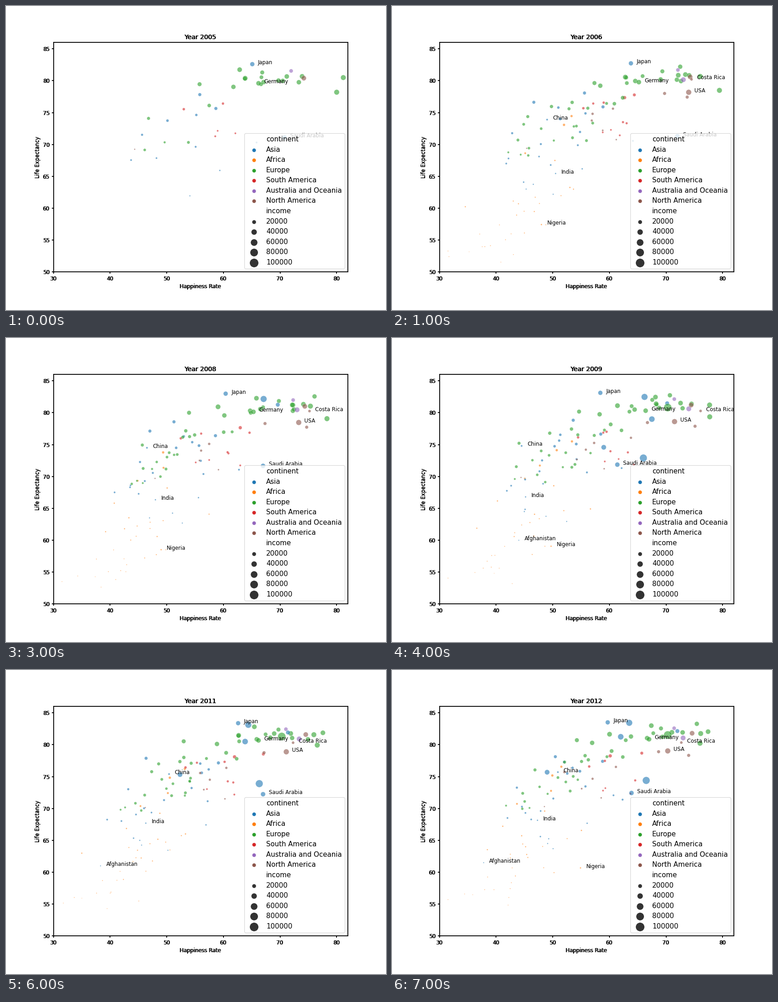
Recreate the animation shown at these times as a matplotlib script. Size 837 by 669 pixels, loop 8000 ms.

```python
import numpy as np
import matplotlib.pyplot as plt
from matplotlib.animation import FuncAnimation

W, H = 837, 669
YEARS = range(2005, 2013)
K = 1.1625  # pixels per typographic point of the chart

plt.rcParams.update({
    "font.family": "DejaVu Sans", "font.size": 10 * K,
    "axes.titlesize": 12 * K, "axes.titlepad": 6 * K, "axes.labelpad": 4 * K,
    "axes.linewidth": 1.6 * K,
    **{f"{a}tick.major.{part}": size * K for a in "xy"
       for part, size in (("size", 3.5), ("pad", 3.5), ("width", 1.6))},
})

ASIA, AFRICA, EUROPE = "#1f77b4", "#ff7f0e", "#2ca02c"
SOUTH, OCEANIA, NORTH = "#d62728", "#9467bd", "#8c564b"

rng = np.random.default_rng(12)
dots = [[] for _ in YEARS]    # (happiness, life, radius, colour) by year
labels = [[] for _ in YEARS]  # (happiness, life, name) by year


def follow(color, radius, life, growth, moods, name=""):
    """One country; moods run up to the last year."""
    first = len(YEARS) - len(moods)
    for t, mood in enumerate(moods, first):
        if mood:
            dots[t].append((mood, life + growth * t, radius, color))
            labels[t].append((mood, life + growth * t, name))


def cloud(color, count, share, lives, moods, spread, radii, growth):
    """Many countries from poor to rich; share of them report in the first year."""
    life = np.linspace(*lives, count) + rng.normal(0, 0.4, count)
    mood = np.linspace(*moods, count) + rng.normal(0, spread, count)
    radius = np.linspace(*radii, count) * rng.uniform(0.85, 1.15, count)
    for t in range(len(YEARS)):
        now = np.maximum(mood + rng.normal(0, 0.35 * spread, count), 31.5)
        here = rng.random(count) < (0.92 if t else share)
        dots[t] += [(m, e + growth * t, r, color)
                    for m, e, r, h in zip(now, life, radius, here) if h]


cloud(AFRICA, 28, 0, (51, 63), (38, 48), 4.5, (0.8, 1.5), 0.55)
cloud(AFRICA, 6, 0, (65, 74), (44, 53), 3, (1.5, 2.7), 0.35)
cloud(ASIA, 22, 0.25, (62, 77.5), (47, 57), 5, (1.4, 3.4), 0.25)
cloud(SOUTH, 10, 0.3, (70.5, 78.3), (56, 63), 5, (2, 3.6), 0.15)
cloud(NORTH, 8, 0.15, (69.5, 78), (52, 68), 4, (1.6, 3.7), 0.15)
cloud(EUROPE, 22, 0.25, (68, 77.3), (46, 56), 5, (2.6, 4.1), 0.28)
cloud(EUROPE, 17, 0.8, (79.4, 81.2), (66, 72), 5, (4.8, 5.5), 0.18)
cloud(OCEANIA, 2, 0.6, (79.9, 81.3), (75, 73), 1.2, (5, 5), 0.15)

# rich or fast growing countries with a steady trend
follow(NORTH, 5.4, 80.4, 0.2, np.linspace(74.2, 74.6, 8))
follow(EUROPE, 5.8, 78.2, 0.29, np.linspace(80, 76, 8))
follow(ASIA, 4.6, 80.6, 0.22, np.linspace(69, 72, 6))
follow(ASIA, 7, 81.2, 0.32, np.linspace(68, 63.5, 6))
follow(ASIA, 6.4, 76, 0.75, np.linspace(67.5, 62, 4))
follow(ASIA, 5.5, 73.1, 0.37, np.linspace(59, 49, 4))
follow(ASIA, 8.1, 70.9, 0.5, np.linspace(66, 66.5, 4))
follow(EUROPE, 8.7, 79.85, 0.24, np.linspace(70.3, 70.3, 4))

# labelled countries
follow(ASIA, 5, 82.6, 0.13, [65.1, 63.8, 62.4, 60.4, 58.4, 60.6, 62.6, 59.7], "Japan")
follow(EUROPE, 5.3, 79.6, 0.18, [66.2, 65.2, 64.2, 65.3, 66.4, 67.2, 66.2, 67], "Germany")
follow(ASIA, 5.2, 71.1, 0.19, [70.8, 72, 72.7, 67, 61.4, 63.1, 67, 63.9], "Saudi Arabia")
follow(ASIA, 2.1, 73.6, 0.3, [49, 48.6, 46.5, 44.5, 46.6, 50.4, 50.9], "China")
follow(ASIA, 1.6, 65, 0.45, [50.5, 50.3, 48, 45.2, 49.9, 46.3, 47.3], "India")
follow(NORTH, 6, 78.05, 0.14, [74, 75.1, 73.3, 71.5, 71.5, 71.1, 70.3], "USA")
follow(NORTH, 3.1, 80.2, 0.02, [74.5, 74.4, 75.2, 76.1, 72.7, 72.3, 72.7], "Costa Rica")
follow(AFRICA, 1.6, 56.9, 0.54, [48, 48.9, 49, 49.7, 47.6, 0, 54.9], "Nigeria")
follow(ASIA, 1.2, 58, 0.5, [44, 47.6, 38.3, 37.8], "Afghanistan")


def make_axes(shift):
    axes = fig.add_axes([0.125 + shift / W, 0.125, 0.775, 0.755])
    axes.set(xlim=(30, 82), ylim=(50, 86), xticks=range(30, 81, 10), yticks=range(50, 86, 5),
             xlabel="Happiness Rate", ylabel="Life Expectancy")
    return axes


def area(radius):
    return 4 * np.square(radius)


def draw_legend():
    rows = [("continent", "none", 0), ("Asia", ASIA, 4), ("Africa", AFRICA, 4),
            ("Europe", EUROPE, 4), ("South America", SOUTH, 4),
            ("Australia and Oceania", OCEANIA, 4), ("North America", NORTH, 4),
            ("income", "none", 0)]
    rows += [(str(n), "#333333", 0.03 * n ** 0.5) for n in range(20000, 100001, 20000)]
    handles = [ax.scatter([], [], s=area(r), color=c, linewidths=0, label=name)
               for name, c, r in rows]
    legend = ax.legend(handles=handles, loc="lower right", fontsize=13 * K, framealpha=0.8)
    legend.get_frame().set_linewidth(K)


fig = plt.figure(figsize=(W / 72, H / 72), dpi=72, facecolor="white")
ax = make_axes(0)
draw_legend()

# a second set of texts, one pixel aside, thickens the lettering
ghost = make_axes(-1)
ghost.patch.set_visible(False)
ghost.spines[:].set_visible(False)
ghost.tick_params(width=0)
ghost.set_zorder(-1)
ax.patch.set_visible(False)

shown = []


def update(t):
    while shown:
        shown.pop().remove()
    for axes in (ax, ghost):
        axes.set_title(f"Year {YEARS[t]}")
    mood, life, radius, color = zip(*dots[t])
    shown.append(ax.scatter(mood, life, s=area(radius), c=color, alpha=0.6,
                            edgecolors="white", linewidths=0.6))
    for mood, life, name in labels[t]:
        shown.append(ax.text(mood + 1, life, name, clip_on=True))
    return shown


anim = FuncAnimation(fig, update, frames=len(YEARS), interval=1000, repeat=True,
                     init_func=lambda: update(0), blit=False)
plt.show()
```
